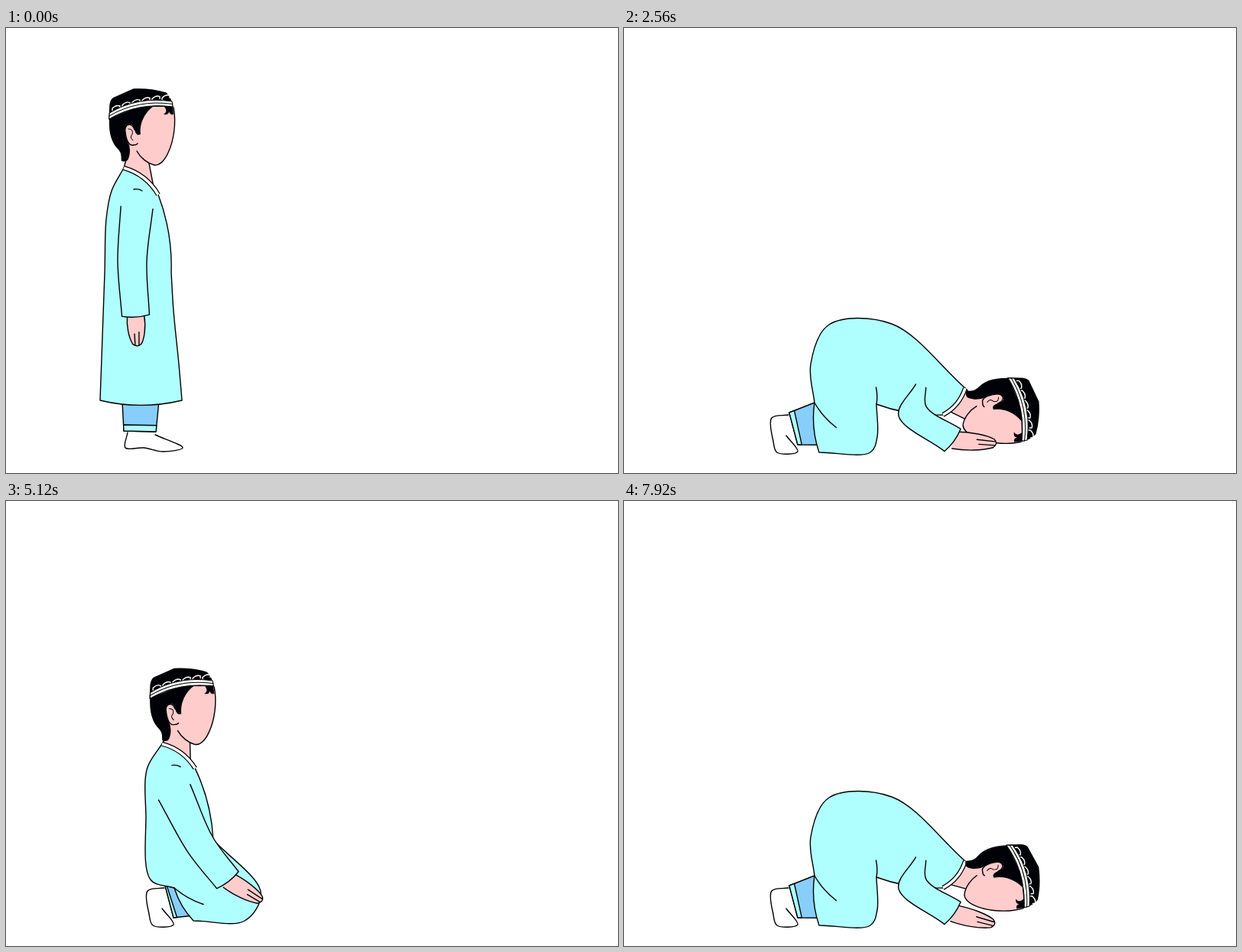
Animation of 800x582 px, one loop 8000 ms. Source, as an HTML page:

```html
<!DOCTYPE html>
<html lang="en">
<head>
<meta charset="utf-8">
<title>Prayer movements</title>
<style>
html, body { margin: 0; width: 100%; height: 100%; overflow: hidden; background: #fff; }
svg { display: block; width: 100%; height: 100%; }
path { fill: none; stroke: #000; stroke-width: 1.4; stroke-linejoin: round; stroke-linecap: round; }
.cloth { fill: #b0ffff; }
.skin { fill: #ffcccc; }
.blue { fill: #87cefa; }
.white { fill: #fff; }
.black { fill: #000208; }
.bare { stroke: none; }
</style>
</head>
<body>
<svg viewBox="0 0 800 582">
  <path id="foot" class="white"/>
  <path id="pants" class="blue"/>
  <path id="cuff" class="cloth"/>
  <path id="neck" class="skin"/>
  <path id="robe" class="cloth"/>
  <path id="crease"/>
  <path id="collarEdge" style="stroke-width:6;stroke-linecap:butt"/>
  <path id="collarBand" style="stroke:#fff;stroke-width:3.6;stroke-linecap:butt"/>
  <g id="head">
    <path class="skin bare" d="M192 103H219C223 125 219 148 212 163C207 174 200 181 193 179C185 177 176 170 171 160L158 168V120Z"/>
    <path d="M219 104C223 125 219 148 212 163C207 174 200 181 193 179C185 177 176 170 171 161"/>
    <path class="black bare" d="M135 118C134 140 139 151 147 159C152 165 150 170 151 174Q158 176 160 171C163 163 162 158 161 153C155 143 154 128 160 126C166 124 167 131 168 134C170 139 172 141 176 139C174 125 182 110 192 103H218L190 97Z"/>
    <path class="black bare" d="M207 103Q212 109 206 113Q213 114 213 109Q214 114 219 113L218 102Z"/>
    <path class="skin" d="M168 133C164 122 154 126 156 136C157 145 160 155 167 153Q171 153 172 151"/>
    <path d="M160 132Q167 132 165 139Q161 143 166 147" style="stroke-width:1"/>
    <path class="black" d="M135 119L136 101Q137 94 140 92L167 80Q190 79 209 85Q215 90 218 103Q172 97 135 119Z"/>
    <path id="arches" style="stroke:#fff"/>
    <path class="white" d="M135 119Q172 97 218 103L217 96Q172 89 135.5 111Z" style="stroke-width:1"/>
    <path d="M135 115Q172 93 218 99.5" style="stroke-width:1"/>
  </g>
  <path id="hand" class="skin"/>
  <path id="sleeve" class="cloth"/>
</svg>
<script>
const LOOP = 8000, STEP = 80;
const PIVOT = [176.5, 112];

// head: x, y, angle. Points: collar back/front; front waist/knee/shin;
// hem front/back; hip up to back; arm shoulder/elbow/wrist; fingertip.
// pad: half width at the shoulder. foot: tuck 0..1, shift.
const stand = {
  head: [176.5, 112, 0], collar: [154, 183, 199, 218],
  front: [216, 320, 219, 370, 226, 440], hem: [230, 487, 123, 487],
  hip: [129, 320, 131, 250, 138, 213],
  arm: [171, 235, 165, 305, 169.5, 376], pad: [21], tip: [172, 416], foot: [0, 0]
};
const kneel = {
  head: [301.5, 264, 23], collar: [253, 310, 279, 347],
  front: [250, 433, 286, 467, 302, 522], hem: [214, 548, 196, 503],
  hip: [155, 460, 153, 420, 190, 357],
  arm: [256, 361, 283, 434, 314, 488], pad: [26], tip: [351, 518], foot: [1, -9]
};
const reach = {
  head: [402.5, 325.5, 43], collar: [337, 349, 348, 387],
  front: [290, 447, 320, 505, 316, 550], hem: [240, 555, 217, 505],
  hip: [196, 465, 195, 425, 245, 375],
  arm: [325, 393, 341, 461, 377.5, 518], pad: [23], tip: [428, 536], foot: [1, 0]
};
const prostrate = {
  head: [510, 499, 88.6], collar: [446, 471, 417, 506],
  front: [330, 492, 331, 535, 322, 555], hem: [255, 555, 249, 490],
  hip: [244, 440, 268, 388, 350, 387],
  arm: [388, 468, 377, 501, 429.5, 539], pad: [7], tip: [487, 543], foot: [1, 5]
};
const rise = {
  head: [371.5, 292, 43], collar: [304, 330, 322, 368],
  front: [288, 453, 319, 500, 319, 549], hem: [242, 552, 218, 505],
  hip: [190, 470, 188, 430, 228, 370],
  arm: [298, 381, 320, 447, 353.5, 508], pad: [25], tip: [393, 540], foot: [1, -1]
};
const sit = {
  head: [231, 252, 0], collar: [205, 318, 248, 350],
  front: [271, 443, 333, 512, 312, 549], hem: [245, 549, 220, 506],
  hip: [189, 495, 183, 410, 185, 350],
  arm: [221, 381, 255, 450, 290.5, 496], pad: [23], tip: [336, 523], foot: [1, -3]
};

const FOOT_FLAT = [[159, 529], [156, 549], [180, 549], [205, 554], [231, 549], [195, 532]];
const FOOT_TUCKED = [[210, 506], [188, 510], [190, 540], [195, 555], [222, 554], [207, 533]];
const ANKLE_FLAT = [[154, 527], [196, 528]];
const ANKLE_TUCKED = [[211, 503], [222, 545]];

const lerp = (a, b, k) => a + (b - a) * k;
const between = (a, b, k) => a.map((v, i) => lerp(v, b[i], k));
const mix = (p, q, k) => Object.fromEntries(
  Object.keys(p).map(part => [part, between(p[part], q[part], k)]));

const squat = { ...mix(stand, kneel, 0.45), hip: [114, 410, 112, 365, 142, 290] };
const bow = { ...prostrate, head: [510.5, 491, 85], tip: [485, 553] };
const lifted = mix(prostrate, rise, 0.03);
const upright = mix(reach, sit, 1.015);
const KEYS = [
  [0, stand], [440, squat], [880, mix(squat, kneel, 0.85)], [1120, kneel],
  [1760, reach], [2480, bow], [2560, prostrate], [3920, prostrate],
  [4000, lifted], [4080, lifted], [4400, reach], [4480, rise],
  [4960, mix(rise, sit, 0.95)], [5200, upright], [6240, upright],
  [6320, sit], [6780, rise], [7120, reach], [7920, bow]
];

function slope(i, part, n) {
  if (i < 0 || i > KEYS.length - 2) return null;
  const [t0, p] = KEYS[i], [t1, q] = KEYS[i + 1];
  return (q[part][n] - p[part][n]) / (t1 - t0);
}

// Tangent that never overshoots a key
function tangent(i, part, n) {
  const a = slope(i - 1, part, n), b = slope(i, part, n);
  if (a === null) return b;
  if (b === null) return a;
  return a * b > 0 ? 2 * a * b / (a + b) : 0;
}

function poseAt(t) {
  let i = 0;
  while (i < KEYS.length - 2 && t >= KEYS[i + 1][0]) i++;
  const [t0, p] = KEYS[i], [t1, q] = KEYS[i + 1];
  const d = t1 - t0, u = (t - t0) / d, v = 1 - u;
  const pose = {};
  for (const part in p) {
    pose[part] = p[part].map((a, n) =>
      a * (1 + 2 * u) * v * v + q[part][n] * u * u * (3 - 2 * u) +
      d * u * v * (v * tangent(i, part, n) - u * tangent(i + 1, part, n)));
  }
  return pose;
}

const el = id => document.getElementById(id);
const setPath = (id, d) => el(id).setAttribute('d', d);
const pt = p => p.map(v => v.toFixed(2)).join(' ') + ' ';
const add = (p, q, k = 1) => p.map((v, i) => v + q[i] * k);
const sub = (p, q) => add(p, q, -1);
const unit = p => p.map(v => v / (Math.hypot(...p) || 1));
const side = ([x, y]) => [y, -x];
const pairs = a => a.flatMap((v, i) => i % 2 ? [] : [[v, a[i + 1]]]);
const poly = points => 'M' + points.map(pt).join('L');

// Shallow arc from p to q, k sets how far it swells
const bend = (p, q, k) => add(between(p, q, 0.5), side(sub(q, p)), k);
const arc = (p, q, k) => `Q${pt(bend(p, q, k))}${pt(q)}`;

// Smooth curve through points, starting at the first
function spline(p) {
  const gap = p.slice(1).map((q, i) => Math.sqrt(Math.hypot(...sub(q, p[i]))) || 1);
  const rate = gap.map((g, i) => sub(p[i + 1], p[i]).map(v => v / g));
  const speed = p.map((_, i) => {
    if (i === 0) return rate[0];
    if (i === gap.length) return rate[i - 1];
    const across = sub(p[i + 1], p[i - 1]).map(v => v / (gap[i - 1] + gap[i]));
    return sub(add(rate[i - 1], rate[i]), across);
  });
  return gap.map((g, i) =>
    `C${pt(add(p[i], speed[i], g / 3))}${pt(add(p[i + 1], speed[i + 1], -g / 3))}${pt(p[i + 1])}`).join('');
}

function headPoint([hx, hy, deg], x, y) {
  const r = deg * Math.PI / 180, dx = x - PIVOT[0], dy = y - PIVOT[1];
  return [hx + dx * Math.cos(r) - dy * Math.sin(r), hy + dx * Math.sin(r) + dy * Math.cos(r)];
}

function drawHead(pose) {
  const [x, y, turn] = pose.head, [back, front] = pairs(pose.collar);
  el('head').setAttribute('transform',
    `translate(${x} ${y}) rotate(${turn}) translate(${-PIVOT[0]} ${-PIVOT[1]})`);
  const throat = between(bend(back, front, 0.2), front, 0.6);
  const at = (px, py) => headPoint(pose.head, px, py);
  setPath('neck', poly([back, at(159, 165), at(180, 152), at(187, 177), throat]));
  const line = `M${pt(back)}${arc(back, front, 0.2)}`;
  setPath('collarEdge', line);
  setPath('collarBand', line);
}

function drawRobe(pose) {
  const [nape, chest] = pairs(pose.collar), [waist, knee, shin] = pairs(pose.front);
  const [toe, heel] = pairs(pose.hem), tuck = pose.foot[0];
  setPath('robe', `M${pt(nape)}${arc(nape, chest, 0.2)}${arc(chest, waist, 0.1)}` +
    spline([waist, knee, shin, toe]) + arc(toe, heel, 0.12) +
    spline([heel, ...pairs(pose.hip), nape]));

  const lap = add(waist, unit(sub(waist, knee)), 22 * tuck);
  const calf = add(add(heel, sub(toe, heel), 0.5 * tuck), sub(shin, toe), 0.38 * tuck);
  const tick = add(nape, [13, 28]), upright = Math.max(0, 1 - pose.head[2] / 20);
  const tickEnd = add(tick, [11, 2], upright);
  setPath('crease', [[lap, waist, 0.1], [heel, calf, -0.1], [tick, tickEnd, 0.2]]
    .filter(([p, q]) => Math.hypot(...sub(q, p)) > 1)
    .map(([p, q, k]) => `M${pt(p)}${arc(p, q, k)}`).join(''));
}

function drawArm(pose) {
  const [shoulder, elbow, wrist] = pairs(pose.arm);
  const upper = unit(sub(elbow, shoulder)), lower = unit(sub(wrist, elbow));
  const joints = [[shoulder, upper, pose.pad[0]], [elbow, unit(add(upper, lower)), 19], [wrist, lower, 18]];
  const edge = s => joints.map(([p, dir, half]) => add(p, side(dir), s * half));
  const back = edge(-1), front = edge(1).reverse();
  setPath('sleeve', `M${pt(back[0])}${spline(back)}${arc(back[2], front[0], -0.12)}${spline(front)}`);

  const along = sub(pose.tip, wrist), across = side(unit(along));
  const h = (k, w) => pt(add(add(wrist, along, k), across, w));
  setPath('hand', `M${h(0, -11)}C${h(0.3, -13)}${h(0.7, -11)}${h(0.93, -6)}Q${h(1.05, 0)}${h(0.94, 5)}` +
    `C${h(0.8, 9)}${h(0.4, 13)}${h(0, 11)}M${h(0.6, -3)}L${h(0.96, -3)}M${h(0.55, 3)}L${h(0.96, 2)}`);
}

function drawLeg(pose) {
  const [tuck, shift] = pose.foot, [toe, heel] = pairs(pose.hem);
  const place = (flat, bent) => flat.map((p, i) => add(between(p, bent[i], tuck), [shift, 0]));
  const foot = place(FOOT_FLAT, FOOT_TUCKED), [b, c] = place(ANKLE_FLAT, ANKLE_TUCKED);
  setPath('foot', `M${pt(foot[0])}${spline(foot)}`);
  const a = between(heel, toe, lerp(0.27, 0, tuck)), d = between(heel, toe, lerp(0.72, 0.85, tuck));
  setPath('pants', poly([a, b, c, d]) + 'Z');
  setPath('cuff', poly([between(a, b, 0.8), b, c, between(d, c, 0.8)]) + 'Z');
}

function draw(t) {
  const pose = poseAt(t);
  drawLeg(pose);
  drawRobe(pose);
  drawHead(pose);
  drawArm(pose);
}

// Row of small arches above the cap's band
setPath('arches', Array.from({ length: 6 }, (_, i) => {
  const x = 139 + i * 13, y = 94 + 14 * (1 - i / 6) ** 2;
  return `M${x} ${y}v-3q5 -5 10 -3v3`;
}).join(''));

const start = performance.now();
let shown = -1;
function tick() {
  const t = Math.floor((performance.now() - start) % LOOP / STEP) * STEP;
  if (t !== shown) draw(shown = t);
  requestAnimationFrame(tick);
}
tick();
</script>
</body>
</html>
```
